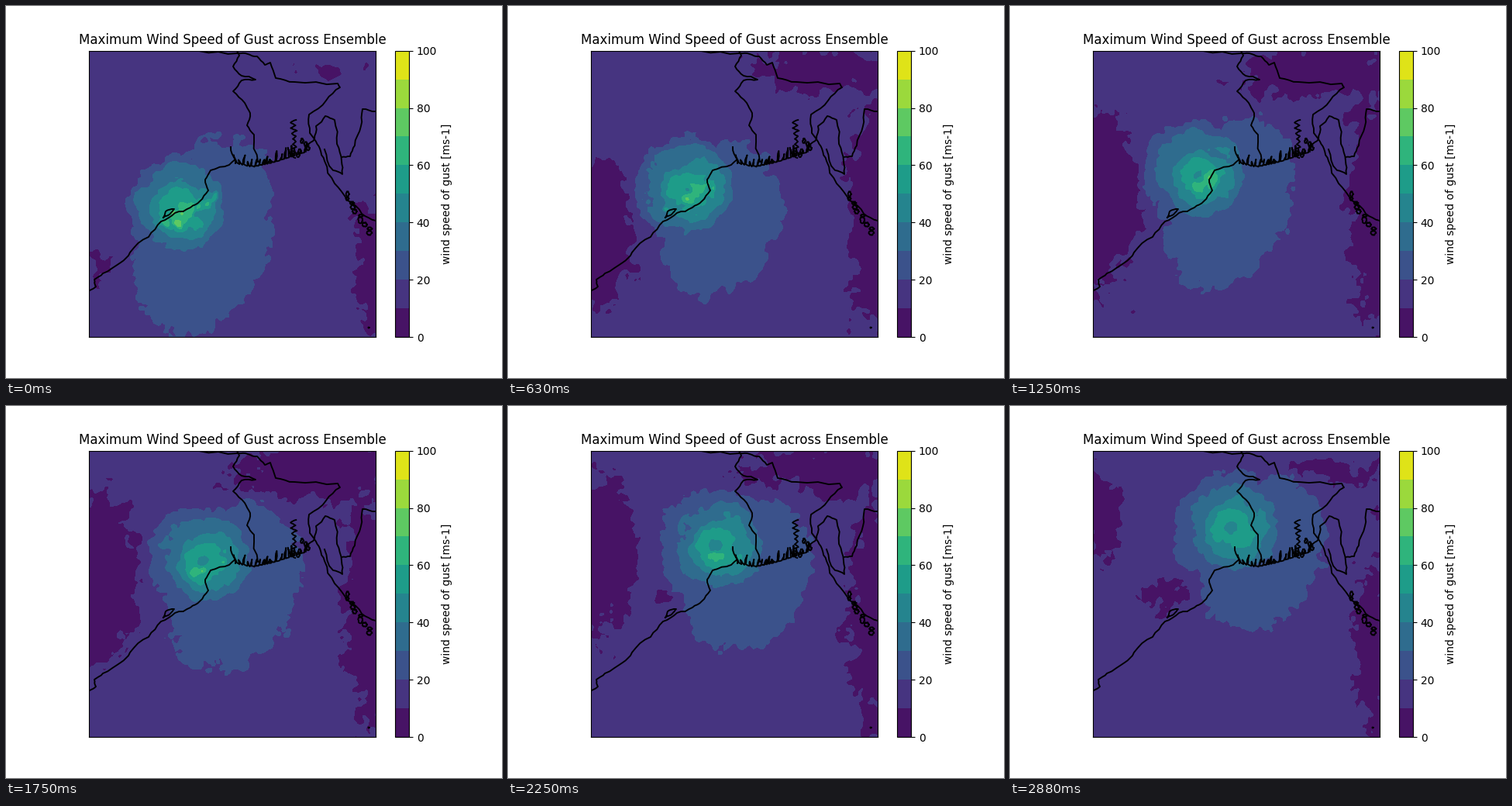
Write a matplotlib script that moves like this. It is 640x480 px and loops after 3010 ms.

```python
import numpy as np
import matplotlib.pyplot as plt
from matplotlib.animation import ArtistAnimation
from matplotlib.cm import ScalarMappable
from matplotlib.colors import BoundaryNorm, ListedColormap

FRAMES, LOOP_MS = 24, 3010
LEFT, RIGHT, TOP, BOTTOM = 107.2, 476.8, 57.6, 427.2
LEVELS = np.arange(0, 101, 10)

rng = np.random.default_rng(12)
xs = np.linspace(LEFT, RIGHT, 186)
ys = np.linspace(TOP, BOTTOM, 186)
X, Y = np.meshgrid(xs, ys)


# ---- wind field -------------------------------------------------------

def smooth_noise(size):
    """Periodic noise of unit variance with features of `size` cells."""
    kx, ky = np.meshgrid(np.fft.fftfreq(len(xs)), np.fft.fftfreq(len(ys)))
    damp = np.exp(-2 * (np.pi * size) ** 2 * (kx ** 2 + ky ** 2))
    field = np.fft.ifft2(np.fft.fft2(rng.normal(size=X.shape)) * damp).real
    return (field - field.mean()) / field.std()


FINE = [smooth_noise(1.2) for _ in range(2)]
COARSE = [smooth_noise(3.5) for _ in range(2)]


def drift(pair, phase):
    return pair[0] * np.cos(phase) + pair[1] * np.sin(phase)


def ramp(depth, width):
    return np.clip(0.5 + depth / (2 * width), 0, 1)


def ellipse(cx, cy, rx, ry, tilt=0.0):
    """Rough distance inside the ellipse's edge, negative outside."""
    c, s = np.cos(tilt), np.sin(tilt)
    u = (X - cx) * c + (Y - cy) * s
    v = (Y - cy) * c - (X - cx) * s
    return (1 - np.hypot(u / rx, v / ry)) * min(rx, ry)


def calm_depth(t):
    """Slack air over the land: it spreads, then draws back."""
    cover = 0.1 + 0.9 * np.sqrt(max(np.sin(np.pi * t), 0))
    west = ellipse(118, 330 - 190 * t, 55 * cover, 120 * cover)
    north = ellipse(410, 84, 115 * cover, 36 * cover)
    east = ellipse(474, 345 - 90 * cover, 25 + 12 * cover, 82 + 80 * cover)
    remnant = ellipse(200, 244, 1 + 27 * t ** 6, 1 + 21 * t ** 6)
    return np.clip(np.max([west, north, east, remnant], axis=0), -25, 25)


def wind(frame):
    t = frame / (FRAMES - 1)
    fine, coarse = drift(FINE, 0.45 * frame), drift(COARSE, 0.3 * frame)
    rough = 2.0 * fine + 2.2 * coarse

    ex, ey = 222 + 68 * t ** 1.25, 262 - 109 * t
    r = np.hypot(X - ex, Y - ey)
    spiral = 3.5 * np.cos(np.arctan2(Y - ey, X - ex) + r / 7)

    # The outer wind is a disc round the eye and a lobe trailing south-east.
    length = 116 - 14 * t + 18 * (1 - t) * np.cos(4 * np.pi * t)
    lobe = ellipse(257 + 68 * t, 300 - 115 * t, 78, length, 0.35)
    storm = ramp(np.maximum(66 + 10 * t - r, lobe) + 1.4 * rough, 7)

    speed = 15 + 10 * storm
    for radius in (55, 38, 25):
        speed += 10 * ramp(ellipse(ex + 4, ey, radius, radius) + rough + spiral, 6)

    core = ramp(ellipse(ex + 6, ey + 6, 28 - 25 * t, 10 - 7 * t, -0.5) + rough - 1, 4)
    speed += core * (10 + 3.5 * fine)
    hole = 9 - 20 * np.exp(-6 * t)
    speed -= 13 * ramp(hole - r + 0.4 * rough, 4)
    speed -= 10 * (1 - storm) * ramp(calm_depth(t) + 4 * fine + 5.5 * coarse, 7)
    return np.clip(speed, 1, 99)


# ---- coast and borders -------------------------------------------------

COAST_WEST = [
    (108, 367), (116, 362), (114, 353), (125, 345), (148, 331), (160, 318), (184, 298),
    (200, 278), (218, 267), (238, 260), (250, 252), (261, 238), (257, 224), (264, 212),
    (288, 205), (296, 198), (290, 182)]
LAGOON = [(203, 273), (206, 265), (217, 262), (212, 268), (203, 273)]
COAST_EAST = [(388, 180), (398, 172), (405, 184), (411, 200), (424, 229), (441, 251),
              (459, 268), (477, 277)]
BORDER_WEST = [
    (298, 58), (301, 64), (293, 78), (304, 90), (322, 95), (304, 96), (293, 110),
    (308, 125), (315, 138), (311, 154), (320, 166), (325, 201)]
BORDER_NORTH = [
    (249, 58), (299, 61), (312, 62), (324, 65), (334, 76), (341, 73), (348, 93),
    (372, 98), (428, 100), (431, 105), (413, 122), (391, 140), (392, 164), (398, 172),
    (400, 155), (412, 142), (424, 147), (427, 178), (433, 200), (434, 217), (422, 212),
    (411, 185)]
BORDER_EAST = [(433, 195), (444, 194), (450, 180), (458, 155), (460, 133), (477, 136)]


def draw(points, jitter=0.09):
    """Polyline roughened by displacing midpoints in proportion to length."""
    p = np.array(points, float)
    for _ in range(2):
        step = np.diff(p, axis=0)
        normal = np.column_stack([-step[:, 1], step[:, 0]])
        middle = p[:-1] + step / 2 + normal * rng.uniform(-jitter, jitter, (len(step), 1))
        p = np.insert(p, np.arange(1, len(p)), middle, axis=0)
    ax.plot(*p.T, color="black", lw=1.35, solid_joinstyle="round", zorder=3)


def islet(cx, cy, rx, ry):
    a = np.linspace(0, 2 * np.pi, 7)
    draw(np.column_stack([cx + rx * np.cos(a), cy + ry * np.sin(a)]), 0.3)


def draw_delta():
    """Mangrove shore cut by narrow leaning inlets, then the wide river mouth."""
    shore, x = [], 296
    while x < 388:
        y = np.interp(x, [296, 318, 345, 388], [203, 208, 202, 188])
        inlet, lean = rng.uniform(4, 15), rng.uniform(-3, 4)
        shore += [(x, y), (x + lean, y - inlet), (x + 1.8, y - 1)]
        x += rng.uniform(3, 6.5)
    draw(shore)
    river = np.arange(196, 146, -3.5)
    draw([(371 + (-1) ** i * rng.uniform(1, 5), y) for i, y in enumerate(river)])


def draw_islands():
    for x, y in zip(rng.uniform(376, 390, 5), np.linspace(174, 192, 5)):
        islet(x, y, 2, rng.uniform(3, 5))
    for s in np.linspace(0, 1, 10):
        islet(438 + 33 * s + rng.uniform(-3, 3), 243 + 50 * s,
              rng.uniform(1, 3.5), rng.uniform(2, 4.5))
    islet(468, 415, 0.5, 0.5)


fig, ax = plt.subplots(figsize=(6.4, 4.8), dpi=100)
colors = ListedColormap(plt.get_cmap("viridis")((LEVELS[:-1] + 5) / 100))
norm = BoundaryNorm(LEVELS, 10)
bar = fig.colorbar(ScalarMappable(norm, colors), ax=ax, ticks=LEVELS[::2],
                   label="wind speed of gust [ms-1]")
bar.minorticks_off()

ax.set(xlim=(LEFT, RIGHT), ylim=(BOTTOM, TOP), xticks=[], yticks=[], aspect="equal")
ax.set_title("Maximum Wind Speed of Gust across Ensemble")

for outline in (COAST_WEST, LAGOON, COAST_EAST, BORDER_WEST, BORDER_NORTH, BORDER_EAST):
    draw(outline)
draw_delta()
draw_islands()

scenes = [[ax.contourf(xs, ys, wind(f), LEVELS, cmap=colors, norm=norm, zorder=1)]
          for f in range(FRAMES)]
anim = ArtistAnimation(fig, scenes, interval=LOOP_MS / FRAMES, repeat=True, repeat_delay=0)

plt.show()
```
